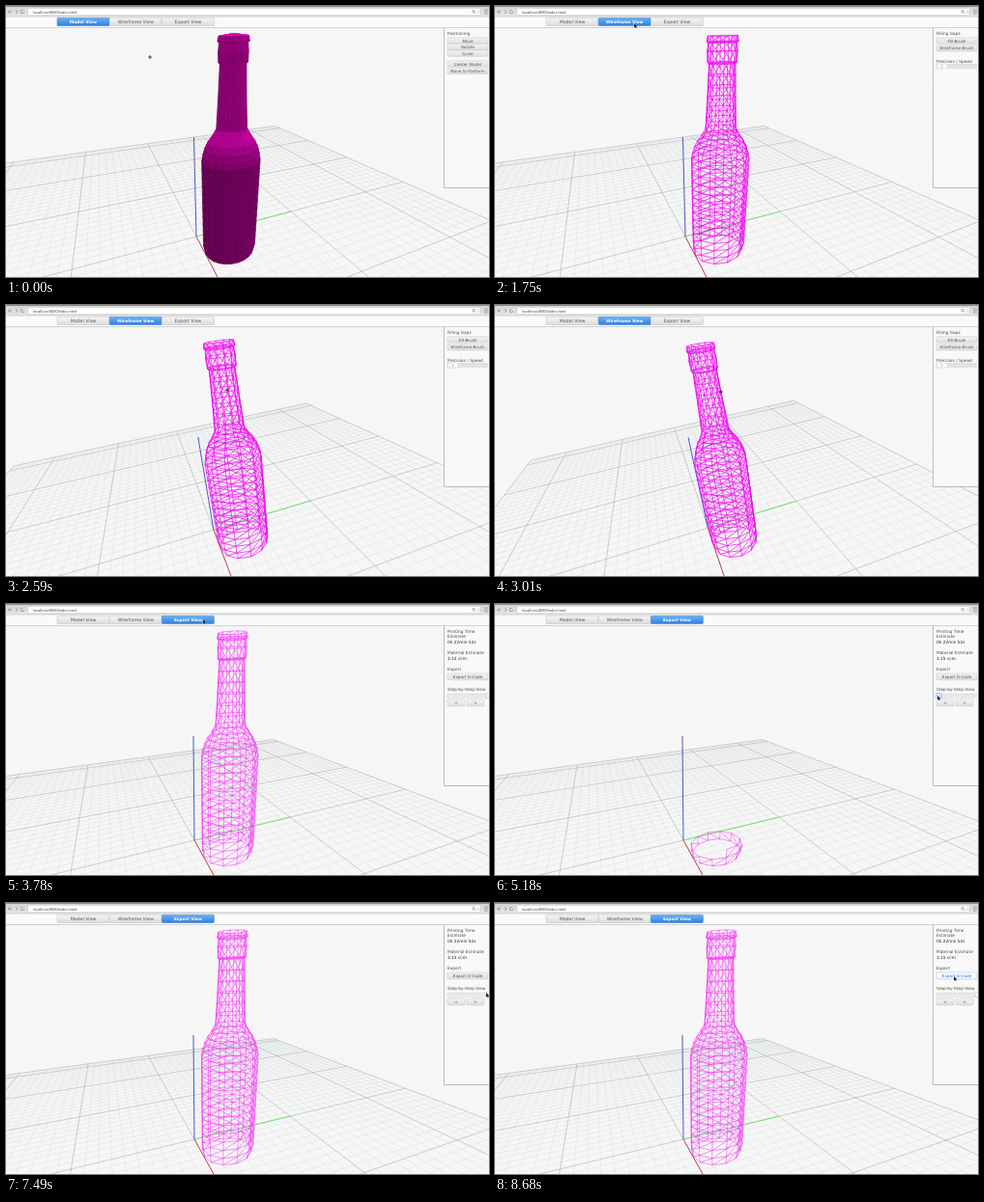
An HTML page with a canvas for the animation above (8890 ms loop, 500 by 281 pixels).

```html
<!DOCTYPE html>
<html lang="en">
<head>
<meta charset="utf-8">
<title>Bottle model viewer</title>
<style>
html, body { margin: 0; width: 100%; height: 100%; overflow: hidden; background: #f6f6f6; }
canvas { display: block; width: 500px; height: 281px; }
</style>
</head>
<body>
<canvas id="stage"></canvas>
<script>
const W = 500, H = 281, LOOP = 8890;
const WIRE_AT = 1470, EXPORT_AT = 3640;
const DRAG = [2100, 2780], SLIDE = [4350, 7560];
const canvas = document.getElementById('stage');
const dpr = window.devicePixelRatio || 1;
canvas.width = W * dpr;
canvas.height = H * dpr;
const ctx = canvas.getContext('2d');
ctx.scale(dpr, dpr);

const UI = '"DejaVu Sans", sans-serif';
const clamp = v => Math.max(0, Math.min(1, v));
const mix = (a, b, k) => a + (b - a) * k;
// Half linear, half smoothstep: the pace of a hand on a mouse
const ease = k => (k + k * k * (3 - 2 * k)) / 2;

// Keys are [time, ...values]
function track(keys, t) {
  let i = 0;
  while (i < keys.length - 2 && t >= keys[i + 1][0]) i++;
  const a = keys[i], b = keys[i + 1];
  const k = ease(clamp((t - a[0]) / (b[0] - a[0])));
  return a.slice(1).map((v, n) => mix(v, b[n + 1], k));
}

const CURSOR = [
  [0, 149, 53], [420, 150, 53], [1260, 145, 20], [1770, 145, 20],
  [DRAG[0], 212, 82], [DRAG[1], 234, 90], [3080, 234, 90], [3500, 205, 18],
  [3800, 205, 18], [SLIDE[0], 498, 96], [5040, 459, 97], [5250, 459, 97],
  [7210, 498, 95], [SLIDE[1], 498, 95], [8050, 476, 78], [LOOP, 476, 78]
];

// Camera: origin, then vanishing point and depth weight of the x, y and z axes
const FRONT = [197, 239, 95, 44, -.305, 1017, 22, .1357, 215, 980, -.122];
const TURNED = [215, 233, 136, 22.5, -.295, 1510, -155, .0837, 330, 915, -.1234];
const PRINT = [195, 245, 100, 73.8, -.32, 1080, 31, .126, 204.6, 1277, -.0948];
const TURN = [[DRAG[0], 0], [DRAG[1], 1.3]];

let cam = FRONT;
const depth = (x, y, z) => 1 + cam[4] * x + cam[7] * y + cam[10] * z;

function project(x, y, z) {
  const r = cam[4] * x, g = cam[7] * y, b = cam[10] * z, w = 1 + r + g + b;
  return [
    (cam[0] + r * cam[2] + g * cam[5] + b * cam[8]) / w,
    (cam[1] + r * cam[3] + g * cam[6] + b * cam[9]) / w
  ];
}

// Adds a segment to the path, cut off where it passes the camera
function segment(a, b) {
  const near = .06, wa = depth(...a), wb = depth(...b);
  if (wa < near && wb < near) return;
  const cut = (p, q, wp, wq) => wp >= near ? p :
    p.map((v, i) => mix(v, q[i], (near - wp) / (wq - wp)));
  ctx.moveTo(...project(...cut(a, b, wa, wb)));
  ctx.lineTo(...project(...cut(b, a, wb, wa)));
}

function stroke(color, width, build) {
  ctx.beginPath();
  build();
  ctx.strokeStyle = color;
  ctx.lineWidth = width;
  ctx.stroke();
}

// Platform centred on the origin, ten cells to a unit
function drawGrid() {
  const nx = 32, ny = 26, x = nx / 10, y = ny / 10;
  const lines = major => () => {
    for (let i = -nx; i <= nx; i++) {
      const strong = i % 10 === 0 || Math.abs(i) === nx;
      if (strong === major) segment([i / 10, -y, 0], [i / 10, y, 0]);
    }
    for (let i = -ny; i <= ny; i++) {
      const strong = i % 10 === 0 || Math.abs(i) === ny;
      if (strong === major) segment([-x, i / 10, 0], [x, i / 10, 0]);
    }
  };
  stroke('rgba(170,186,184,.36)', .5, lines(false));
  stroke('rgba(140,148,148,.62)', .7, lines(true));
}

function drawAxes() {
  const axis = (color, end) => stroke(color, .9, () => segment([0, 0, 0], end));
  axis('#c23a4a', [1, 0, 0]);
  axis('#62ee62', [0, 1, 0]);
  axis('#3a42c4', [0, 0, 1]);
}

// Bottle outline as [height, radius]
const PROFILE = [
  [0, .2], [.03, .214], [.87, .219], [.95, .204], [1.02, .172], [1.08, .132],
  [1.12, .112], [1.35, .1], [1.6, .09], [1.61, .1], [1.685, .102],
  [1.74, .096], [1.75, .106], [1.785, .1], [1.8, 0]
];
const ROWS = [];
for (let i = 0; i <= 12; i++) ROWS.push(i * .0725);
for (let i = 1; i <= 5; i++) ROWS.push(.87 + i * .05);
for (let i = 1; i <= 6; i++) ROWS.push(1.12 + i * .08);
ROWS.push(1.61, 1.685, 1.74, 1.75, 1.785, 1.8);

function radius(z) {
  let i = 0;
  while (i < PROFILE.length - 2 && z > PROFILE[i + 1][0]) i++;
  const [a, b] = [PROFILE[i], PROFILE[i + 1]];
  return mix(a[1], b[1], clamp((z - a[0]) / (b[0] - a[0])));
}

function bottlePoint(angle, z) {
  const r = radius(z);
  return [.297 + r * Math.cos(angle), .203 + r * Math.sin(angle), z];
}

function polygon(points, color) {
  ctx.beginPath();
  points.forEach(p => ctx.lineTo(...p));
  ctx.closePath();
  ctx.fillStyle = ctx.strokeStyle = color;
  ctx.lineWidth = .7;
  ctx.fill();
  ctx.stroke();
}

const pink = k => `rgb(${k | 0},0,${k * .82 | 0})`;

// Lit from above, so the dark body stands against the shoulder and the lip
function drawSolid() {
  const n = 24, step = 2 * Math.PI / n, faces = [];
  for (let i = 0; i < ROWS.length - 1; i++) {
    const z0 = ROWS[i], z1 = ROWS[i + 1];
    const slope = (radius(z0) - radius(z1)) / (z1 - z0);
    const up = slope / Math.hypot(1, slope);
    for (let j = 0; j < n; j++) {
      const a = j * step, b = a + step, mid = a + step / 2;
      const pts = [[a, z0], [b, z0], [b, z1], [a, z1]].map(c => project(...bottlePoint(...c)));
      const [p, q, r] = pts;
      if ((q[0] - p[0]) * (r[1] - p[1]) - (q[1] - p[1]) * (r[0] - p[0]) >= 0) continue;
      const k = 108 + 10 * Math.sin(mid) + 115 * Math.max(0, up) + 26 * clamp((z0 - .95) / .2);
      faces.push({ pts, w: depth(...bottlePoint(mid, z0)), color: pink(Math.min(k, 235)) });
    }
  }
  faces.sort((a, b) => b.w - a.w).forEach(f => polygon(f.pts, f.color));
}

function drawWire(color, width, part) {
  const n = 12, step = 2 * Math.PI / n;
  const total = (ROWS.length - 2) * n;
  const count = Math.round(mix(n * 1.1, total, part));
  const at = (j, i) => bottlePoint(j * step, ROWS[i]);
  stroke(color, width, () => {
    for (let k = 0; k < count; k++) {
      const i = Math.floor(k / n), j = k % n;
      if (i === 0) segment(at(j, 0), at(j + 1, 0));
      segment(at(j, i), at(j, i + 1));
      segment(at(j, i), at(j + 1, i + 1));
      segment(at(j, i + 1), at(j + 1, i + 1));
    }
  });
}

function text(str, x, y, color = '#4a4a4a', size = 4.3, align = 'left', font = UI, weight = '') {
  ctx.font = `${weight} ${size}px ${font}`;
  ctx.textAlign = align;
  ctx.fillStyle = color;
  ctx.fillText(str, x, y);
}

function box(x, y, w, h, top, bottom, border, r = 1) {
  const g = ctx.createLinearGradient(0, y, 0, y + h);
  g.addColorStop(0, top);
  g.addColorStop(1, bottom);
  ctx.beginPath();
  ctx.roundRect(x, y, w, h, r);
  ctx.fillStyle = g;
  ctx.fill();
  ctx.strokeStyle = border;
  ctx.lineWidth = .5;
  ctx.stroke();
}

function button(label, y, h = 6.3, x = 457, w = 42, hot = false) {
  box(x, y, w, h, hot ? '#fff' : '#f4f4f4', hot ? '#f4f8ff' : '#dedede', hot ? '#9fb8dc' : '#c4c4c4');
  text(label, x + w / 2, y + h / 2 + 1.6, hot ? '#2f6fd0' : '#555', 4.2, 'center');
}

function drawBrowser() {
  box(-1, -1, W + 2, 12, '#d2d2d2', '#e6e6e6', '#b4b4b4', 0);
  ctx.fillStyle = '#8d8d8d';
  ctx.fillRect(0, 0, W, 1);
  box(22.5, 2.3, 469, 7.4, '#fff', '#fff', '#b8b8b8');
  text('localhost:8080/index.html', 28, 7.5, '#444', 4, 'left', '"Liberation Sans", sans-serif');
  stroke('#777', .6, () => {
    ctx.moveTo(4.5, 4.2); ctx.lineTo(2.5, 6); ctx.lineTo(4.5, 7.8);
    ctx.moveTo(2.5, 6); ctx.lineTo(6, 6);
    ctx.moveTo(10, 4.2); ctx.lineTo(12, 6); ctx.lineTo(10, 7.8);
    ctx.moveTo(18.7, 6); ctx.arc(17, 6, 1.7, 0, 5);
    ctx.moveTo(485.3, 5.6); ctx.arc(484, 5.6, 1.3, 0, 7);
    ctx.moveTo(485, 6.6); ctx.lineTo(486.4, 8);
    for (let y = 4; y <= 8; y += 2) { ctx.moveTo(495, y); ctx.lineTo(499, y); }
  });
  text('\u2606', 489.5, 7.9, '#777', 5, 'center');
}

function drawTabs(active) {
  ctx.fillStyle = '#fafafa';
  ctx.fillRect(0, 11, W, 11);
  ctx.fillStyle = '#c8c8c8';
  ctx.fillRect(0, 22, W, .8);
  ['Model View', 'Wireframe View', 'Export View'].forEach((name, i) => {
    const x = 53 + i * 54.2, on = i === active;
    box(x, 12.2, 54, 8.3, on ? '#6cb2f5' : '#f6f6f6', on ? '#2f7fe0' : '#dcdcdc', on ? '#3a78c4' : '#bdbdbd');
    text(name, x + 27, 18.1, on ? '#fff' : '#555', on ? 4.3 : 4.7, 'center', UI, on ? 'bold' : '');
  });
}

// Fine dotted texture of the side panel
const tile = document.createElement('canvas');
tile.width = tile.height = 4;
const dots = tile.getContext('2d');
dots.fillStyle = '#efefef';
dots.fillRect(0, 0, 1, 1);
dots.fillRect(2, 2, 1, 1);
const texture = ctx.createPattern(tile, 'repeat');

function drawPanel(view, part, hot) {
  ctx.fillStyle = '#fafafa';
  ctx.fillRect(453.5, 22.5, 47, 166);
  ctx.fillStyle = texture;
  ctx.fillRect(456, 24, 44, 162);
  stroke('#b5b5b5', .9, () => {
    ctx.moveTo(453.5, 22.5); ctx.lineTo(453.5, 188.5); ctx.lineTo(500, 188.5);
  });
  if (view === 0) {
    text('Positioning', 457, 29.6);
    button('Move', 32.8);
    button('Rotate', 39.4);
    button('Scale', 46);
    button('Center Model', 56.8);
    button('Move to Platform', 64.2);
  } else if (view === 1) {
    text('Filling Gaps', 457, 29.6);
    button('Fill-Brush', 32.8);
    button('Wireframe-Brush', 40.6);
    text('Precision / Speed', 457, 58.5);
    box(457, 60.6, 41.5, 4, '#dedede', '#e8e8e8', '#cfcfcf');
    box(457, 60, 5.5, 5.2, '#fff', '#f2f2f2', '#c0c0c0');
    box(463, 60, 5, 5.2, '#fff', '#f6f6f6', '#d4d4d4');
  } else {
    text('Printing Time', 457, 29.6);
    text('Estimate', 457, 34.8);
    text('0h 22min 52s', 457, 40.8, '#222');
    text('Material Estimate', 457, 52);
    text('3.15 ccm', 457, 58.3, '#222');
    text('Export', 457, 69.3);
    button('Export G-Code', 72, 6.8, 457, 42, hot);
    text('Step-by-Step View', 457, 89.8);
    box(457, 93.3, 41.5, 4, '#e4e4e4', '#eee', '#d0d0d0');
    const held = part < 1;
    box(456.8 + 40 * part, 92.5, 5.6, 5.6, held ? '#e4f0ff' : '#fff', held ? '#b9d4f4' : '#e8e8e8', held ? '#5c94d6' : '#b4b4b4');
    button('<', 99, 7, 457, 18);
    button('>', 99, 7, 477, 18);
  }
}

function drawCursor(x, y, moving) {
  if (moving) {
    stroke('#222', .8, () => {
      ctx.moveTo(x - 2, y); ctx.lineTo(x + 2, y);
      ctx.moveTo(x, y - 2); ctx.lineTo(x, y + 2);
    });
    return;
  }
  ctx.beginPath();
  [[0, 0], [0, 4.6], [1.1, 3.7], [1.9, 5.2], [2.7, 4.8], [2, 3.4], [3.4, 3.2]]
    .forEach(p => ctx.lineTo(x - 1 + p[0], y - 2 + p[1]));
  ctx.closePath();
  ctx.fillStyle = '#222';
  ctx.strokeStyle = '#fff';
  ctx.lineWidth = .6;
  ctx.stroke();
  ctx.fill();
}

function draw(t) {
  const view = t < WIRE_AT ? 0 : t < EXPORT_AT ? 1 : 2;
  const [mx, my] = track(CURSOR, t);
  const [turn] = track(TURN, t);
  const sliding = t > SLIDE[0] && t < SLIDE[1];
  const part = sliding ? clamp((mx - 459) / 39) : 1;
  cam = view === 2 ? PRINT : FRONT.map((v, i) => mix(v, TURNED[i], turn));

  ctx.fillStyle = '#f6f6f6';
  ctx.fillRect(0, 0, W, H);
  drawGrid();
  drawAxes();
  if (view === 0) drawSolid();
  else if (view === 1) drawWire('#ee0cee', .7, 1);
  else drawWire('#f22cf2', .5, part);
  drawPanel(view, part, t > 8000);
  drawTabs(view);
  drawBrowser();
  drawCursor(mx, my, my > 24 && view < 2);
}

const start = performance.now();
function frame() {
  draw((performance.now() - start) % LOOP);
  requestAnimationFrame(frame);
}
frame();
</script>
</body>
</html>
```
